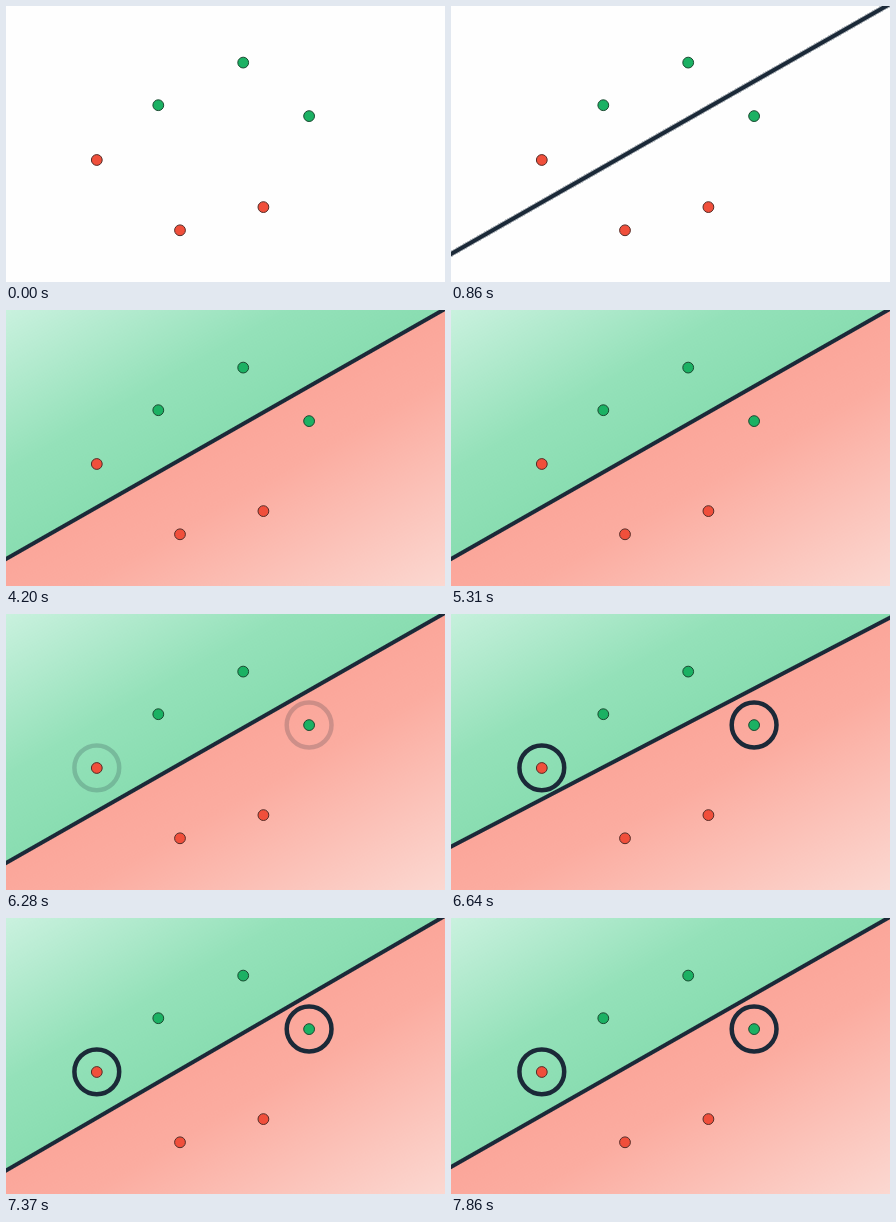
These frames come from a looping animation (439 px wide and 276 px high, 8 s). An HTML page:

```html
<!DOCTYPE html>
<html lang="en">
<head>
<meta charset="utf-8">
<title>Linear classifier</title>
<style>
  html, body { margin: 0; width: 100%; height: 100%; overflow: hidden; background: #fefefe; }
  svg { display: block; width: 439px; height: 276px; }

  .lift, .tilt, .line, .areas, .rings { animation: 8s step-end infinite; }
  .lift { animation-name: settle; }
  .tilt { animation-name: tilt; transform-origin: 340px 55px; }
  .line { animation-name: line; stroke: #1b2938; }
  .areas { animation-name: areas; }
  .rings { animation-name: rings; fill: none; stroke: #1b2938; stroke-width: 4.5; }
  .good { fill: #1bb163; stroke: #19482f; }
  .bad { fill: #f04f3b; stroke: #542c27; }

  /* Line and green dots drop one pixel when the regions appear */
  @keyframes settle {
    0% { transform: translateY(-1px); }
    52.5%, 100% { transform: none; }
  }
  @keyframes line {
    0% { opacity: 0; stroke-width: 4.7px; }
    6.25% { opacity: .25; }
    7.75% { opacity: .5; }
    9.25% { opacity: .75; }
    10.75% { opacity: 1; }
    52.5% { stroke-width: 4.1px; }
    100% { opacity: 1; stroke-width: 4.1px; }
  }
  @keyframes areas {
    0% { opacity: 0; }
    52.5%, 100% { opacity: 1; }
  }
  @keyframes rings {
    0% { opacity: 0; }
    78.5% { opacity: .2; }
    80% { opacity: .55; }
    81.5% { opacity: .88; }
    83%, 100% { opacity: 1; }
  }
  @keyframes tilt {
    0%, 78.5% { transform: rotate(0deg); }
    80% { transform: rotate(.5deg); }
    81.5% { transform: rotate(1.5deg); }
    83% { transform: rotate(2.12deg); }
    84.5% { transform: rotate(1.8deg); }
    86% { transform: rotate(.6deg); }
    87.625% { transform: rotate(-.8deg); }
    89.125% { transform: rotate(-1.49deg); }
    90.625% { transform: rotate(-1.2deg); }
    92.125% { transform: rotate(-.45deg); }
    93.625%, 100% { transform: rotate(0deg); }
  }
</style>
</head>
<body>
<svg viewBox="0 0 439 276">
  <defs>
    <linearGradient id="green" gradientUnits="userSpaceOnUse" x1="0" y1="0" x2="0" y2="-216">
      <stop offset="0" stop-color="#89ddb1"/>
      <stop offset=".35" stop-color="#94e1b9"/>
      <stop offset="1" stop-color="#c9f1de"/>
    </linearGradient>
    <linearGradient id="red" gradientUnits="userSpaceOnUse" x1="0" y1="0" x2="0" y2="241">
      <stop offset="0" stop-color="#fba69a"/>
      <stop offset=".25" stop-color="#fbaca0"/>
      <stop offset="1" stop-color="#fbd8d1"/>
    </linearGradient>
  </defs>

  <g class="lift">
    <g class="tilt">
      <!-- The x axis of this group runs along the boundary -->
      <g transform="translate(0 249) rotate(-29.67)">
        <g class="areas">
          <rect x="-300" y="-500" width="1200" height="501" fill="url(#green)"/>
          <rect x="-300" width="1200" height="500" fill="url(#red)"/>
        </g>
        <path class="line" d="M-300 0H900"/>
      </g>
    </g>
    <g class="good">
      <circle cx="152.3" cy="100.2" r="5.4"/>
      <circle cx="237.2" cy="57.6" r="5.4"/>
      <circle cx="303.1" cy="111.1" r="5.4"/>
    </g>
  </g>

  <g class="bad">
    <circle cx="90.8" cy="154" r="5.4"/>
    <circle cx="174" cy="224.3" r="5.4"/>
    <circle cx="257.4" cy="201.1" r="5.4"/>
  </g>

  <g class="rings">
    <circle cx="90.8" cy="153.8" r="22.4"/>
    <circle cx="303.1" cy="111" r="22.4"/>
  </g>
</svg>
</body>
</html>
```
